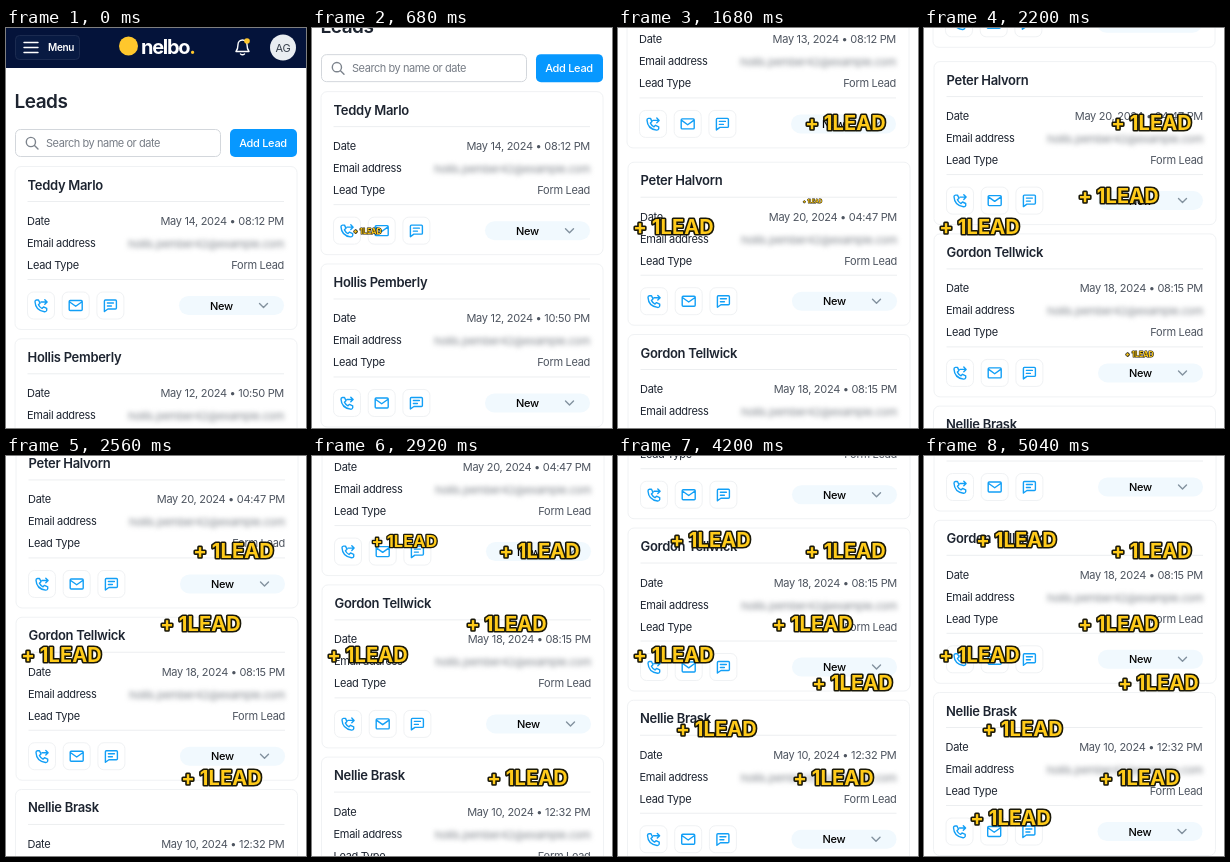
Recreate the animation shown at these times as an HTML page. Size 300 by 400 pixels, loop 5.48 s.

```html
<!DOCTYPE html>
<html lang="en">
<head>
<meta charset="utf-8">
<title>Leads</title>
<style>
  html, body { margin: 0; width: 100%; height: 100%; overflow: hidden; background: #fff; }
  svg { display: block; width: 300px; height: 400px; font: 11px Inter, sans-serif; letter-spacing: -.3px; fill: #1d2430; }
  .end { text-anchor: end; fill: #4e5560; letter-spacing: -.3px; }
  .mid { text-anchor: middle; }
  .name { font-size: 13px; font-weight: 600; }
  .blur { filter: blur(2.6px); fill: #82878e; }
  .card, .box { fill: #fff; stroke: #f0f2f4; }
  .rule { stroke: #eceef0; }
  .line { fill: none; stroke-width: 1.4; stroke-linecap: round; stroke-linejoin: round; }
  .blue { stroke: #129ff6; }
  .badge { font-size: 20px; font-weight: 700; letter-spacing: .1px; text-anchor: middle;
    fill: #ffcb1a; stroke: #1a1808; stroke-width: 3.2px; stroke-linejoin: round; paint-order: stroke; }
</style>
</head>
<body>
<svg viewBox="0 0 300 400">
  <g id="page">
    <rect width="300" height="40" fill="#04133a"/>
    <rect x="9.5" y="7.5" width="64" height="24" rx="4" fill="#081a42" stroke="#1b2b50"/>
    <path class="line" stroke="#fff" d="M18 14.5h14M18 19.5h14M18 24.5h14"/>
    <text x="42" y="23" fill="#fff" font-weight="600" font-size="10">Menu</text>
    <circle cx="122.5" cy="18" r="9.5" fill="#ffc72c"/>
    <text x="135" y="26" fill="#fff" style="font-size:20px;font-weight:700;letter-spacing:-1.3px">nelbo<tspan fill="#ffc72c">.</tspan></text>
    <path class="line" stroke="#fff" d="M230 23.5q2-2.5 2-7a4.5 4.5 0 0 1 9 0q0 4.5 2 7zM234.500 26q2 1.500 4 0"/>
    <circle cx="241" cy="13" r="2.8" fill="#ffc72c"/>
    <circle cx="277" cy="19.5" r="13" fill="#e9edf1"/>
    <text class="mid" x="277" y="23.5" fill="#38414d">AG</text>
    <text x="8.5" y="79.5" style="font-size:19px;font-weight:600;letter-spacing:-.5px">Leads</text>
    <rect x="9.5" y="101.5" width="205" height="27" rx="5" fill="#fff" stroke="#d3d7dc"/>
    <path class="line" stroke="#7c838c" d="M29.5 114a4.6 4.6 0 1 1-9.2 0a4.6 4.6 0 1 1 9.2 0M28.5 117.5l3.5 3.5"/>
    <text x="40" y="119" fill="#777d86" style="letter-spacing:-.45px">Search by name or date</text>
    <rect x="224" y="101" width="67" height="28" rx="5" fill="#0798ff"/>
    <text class="mid" x="257" y="119" fill="#fff" font-weight="500">Add Lead</text>
  </g>
  <g id="badges"></g>
</svg>
<script>
const LOOP = 5480, SCROLL_TIME = 5022, DISTANCE = 768.5, STEP = 40, POP = 500;

// name, date, top edge, sideways shift
const cards = [
  ['Teddy Marlo', 'May 14, 2024 • 08:12 PM', 138, 0],
  ['Hollis Pemberly', 'May 12, 2024 • 10:50 PM', 310.3, 0],
  ['Clara Wendham', 'May 13, 2024 • 08:12 PM', 482.7, 0],
  ['Peter Halvorn', 'May 20, 2024 • 04:47 PM', 660, 1],
  ['Gordon Tellwick', 'May 18, 2024 • 08:15 PM', 832.3, 1],
  ['Nellie Brask', 'May 10, 2024 • 12:32 PM', 1004.5, .5],
];

// start time, centre x, baseline y
const badges = [
  [480, 55.5, 206], [1040, 227.5, 102], [1520, 194.5, 175], [2000, 215.5, 329],
  [2555, 92.5, 91], [3100, 234.5, 234], [3640, 98.5, 280], [4200, 86.5, 369],
];

const icons = [
  'M-4.5-5.5l2 0 1.5 3.2-1.6 1.5q1.3 2.6 3.6 3.7l1.5-1.5 3.2 1.5v2q-.5 1.5-2.2 1.3Q-5.500 5-6-3.800-6-5.300-4.500-5.500M0-3.500h6M3.800-5.800l2.300 2.300-2.300 2.300',
  'M-5.5-5h11q1 0 1 1v8q0 1-1 1h-11q-1 0-1-1v-8q0-1 1-1M-6-3.5l6 4.3 6-4.3',
  'M-5-5.5h10q1 0 1 1v7q0 1-1 1h-7.5l-3.5 2.5v-10.500q0-1 1-1M-3-2.500h6M-3 .5h4',
];

const button = (path, i) => `<g transform="translate(${35 + i * 34.7} 139.5)">
  <rect class="box" x="-13.5" y="-13.5" width="27" height="27" rx="6"/><path class="line blue" d="${path}"/></g>`;

const card = ([name, date, top, dx]) => `<g transform="translate(${dx} ${top})">
  <rect class="card" x="9" y=".5" width="282" height="163" rx="6"/>
  <text class="name" x="21.5" y="23.5">${name}</text>
  <path class="rule" d="M21.5 35.5H278M21.5 113.5H278"/>
  <text x="21" y="59">Date</text><text class="end" x="278" y="59">${date}</text>
  <text x="21" y="81">Email address</text><text class="end blur" x="278" y="82">hollis.pember42@example.com</text>
  <text x="21" y="103">Lead Type</text><text class="end" x="278" y="103">Form Lead</text>
  ${icons.map(button).join('')}
  <rect x="173" y="130" width="105" height="19" rx="9.5" fill="#f1f9fe"/>
  <text class="mid" x="215.5" y="143.5" font-weight="500" fill="#000">New</text>
  <path class="line" stroke="#82919e" d="M253.5 137.5l4 4 4-4"/>
</g>`;

const page = document.getElementById('page');
const layer = document.getElementById('badges');
page.insertAdjacentHTML('beforeend', cards.map(card).join(''));
layer.innerHTML = badges.map(() => '<text class="badge">+ 1LEAD</text>').join('');

const clamp = v => Math.min(1, Math.max(0, v));
const smooth = s => s * s * (3 - 2 * s);

// cubic-bezier(.34, 0, 0, 1), solved by bisection
function glide(x) {
  let low = 0, high = 1;
  for (let i = 0; i < 24; i++) {
    const s = (low + high) / 2;
    if (1.02 * s * (1 - s) ** 2 + s ** 3 < x) low = s; else high = s;
  }
  return smooth(high);
}

function draw(now) {
  const t = Math.floor(now % LOOP / STEP) * STEP;
  page.setAttribute('transform', `translate(0 ${-DISTANCE * glide(clamp(t / SCROLL_TIME))})`);
  badges.forEach(([start, x, y], i) => {
    const scale = smooth(clamp((t - start) / POP));
    const text = layer.children[i];
    text.setAttribute('visibility', scale ? 'visible' : 'hidden');
    text.setAttribute('transform', `translate(${x} ${y}) scale(${scale})`);
  });
}

const begin = performance.now();
function frame() {
  draw(performance.now() - begin);
  requestAnimationFrame(frame);
}
frame();
</script>
</body>
</html>
```
